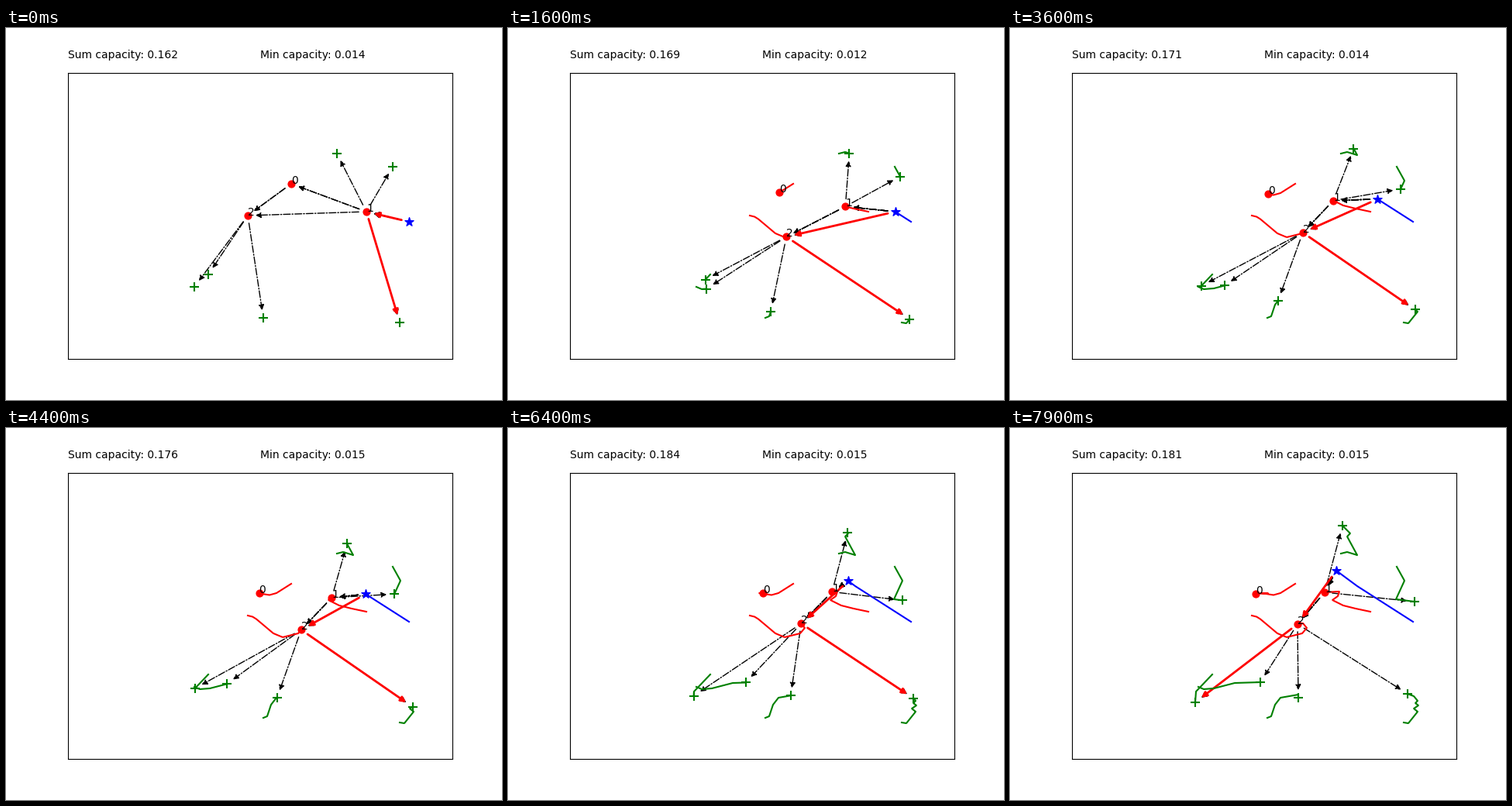
Recreate the animation shown at these times as a matplotlib script. Size 640 by 480 pixels, loop 8 s.

```python
import numpy as np
import matplotlib.pyplot as plt
from matplotlib.animation import FuncAnimation
from matplotlib.patches import FancyArrowPatch

FRAMES, STEP_MS = 80, 100
REROUTE, NEW_BOTTLENECK = 7, 72
STYLES = {
    "relay": dict(color="red", marker="o", s=40),
    "user": dict(color="green", marker="+", s=70),
    "source": dict(color="blue", marker="*", s=70),
}
EARLY = ["S1A", "S1B", "S12E", "S102C", "S102D", "S1F"]
LATE = ["S1A", "S1B", "S12C", "S12D", "S12E", "S2F"]

steps = np.arange(FRAMES)
progress = steps / (FRAMES - 1)


def walk(*points, rush=0.0):
    """Follow waypoints at steady speed; `rush` is the share covered in an early sprint."""
    pts = np.array(points, float)
    reach = np.r_[0, np.cumsum(np.hypot(*np.diff(pts, axis=0).T))]
    sprint = 1 - np.exp(-progress / 0.12)
    gone = reach[-1] * (rush * sprint + (1 - rush) * progress)
    return np.column_stack([np.interp(gone, reach, c) for c in pts.T])


# Waypoints in stage pixels
paths = {
    "S": walk((520, 250), (448, 204), (421, 184)),
    "0": walk((368, 201), (349, 213), (340, 215.5), (324, 213), (333, 213),
              (317, 214), rush=0.15),
    "1": walk((465, 237), (446, 233), (430, 229), (416, 222), (423, 217),
              (425, 211), (406, 212), rush=0.25),
    "2": walk((312, 242), (320, 244), (345, 265), (357, 270), (377, 265),
              (383, 258), (378, 252), (371, 253), rush=0.6),
    "A": walk((427, 162), (435, 160), (448, 164), (435, 140), (439, 136), (429, 126)),
    "B": walk((499, 179), (509, 197), (498, 221), (522, 224)),
    "C": walk((261, 318), (240, 340), (239, 354)),
    "D": walk((243, 334), (250, 337), (263, 336), (290, 329), (323, 328), rush=-0.06),
    "E": walk((332, 374), (337, 372), (342, 357), (349, 348), (372, 344), (372, 348)),
    "F": walk((508, 380), (514, 381), (526, 366), (521, 362), (527, 358),
              (523, 355), (526, 352), (521, 346), (513, 343)),
}

# Capacities in thousandths, drifting between a few readings
READ_AT = [0, 16, 24, 36, 52, 64, 79]
sums = np.interp(steps, READ_AT, [162, 169, 166, 171, 182, 184, 181]) / 1000
mins = np.interp(steps, READ_AT, [14, 12, 13, 14, 15, 15, 15]) / 1000


def kind_of(name):
    return "source" if name == "S" else "relay" if name.isdigit() else "user"


fig, ax = plt.subplots(figsize=(6.4, 4.8), dpi=100)
ax.set(xlim=(80, 576), ylim=(427.2, 57.6), xticks=[], yticks=[])
sum_text = ax.text(0, 1.05, "", transform=ax.transAxes)
min_text = ax.text(0.5, 1.05, "", transform=ax.transAxes)

trails, dots, labels, arrows = {}, {}, {}, []
for name, path in paths.items():
    style = STYLES[kind_of(name)]
    trails[name], = ax.plot([], [], color=style["color"], lw=1.5)
    dots[name] = ax.scatter(*path[0], zorder=2, **style)
    if name.isdigit():
        labels[name] = ax.text(*path[0], name)


def add_route(route, k, **style):
    for a, b in zip(route, route[1:]):
        arrow = FancyArrowPatch(paths[a][k], paths[b][k], arrowstyle="-|>",
                                mutation_scale=10, shrinkA=7.1, shrinkB=7.1,
                                zorder=1, **style)
        arrows.append(ax.add_patch(arrow))


def draw(k):
    while arrows:
        arrows.pop().remove()
    routes = EARLY if k < REROUTE else LATE
    for route in routes:
        add_route(route, k, color="black", lw=1, linestyle="dashdot")
    worst = "S2C" if k >= NEW_BOTTLENECK else routes[-1]
    add_route(worst, k, color="red", lw=2)

    for name, path in paths.items():
        trails[name].set_data(*path[:k + 1].T)
        dots[name].set_offsets(path[k:k + 1])
    for name, label in labels.items():
        label.set_position(paths[name][k])
    sum_text.set_text(f"Sum capacity: {sums[k]:.3f}")
    min_text.set_text(f"Min capacity: {mins[k]:.3f}")


anim = FuncAnimation(fig, draw, frames=FRAMES, init_func=lambda: None,
                     interval=STEP_MS, repeat=True, repeat_delay=0)
plt.show()
```
